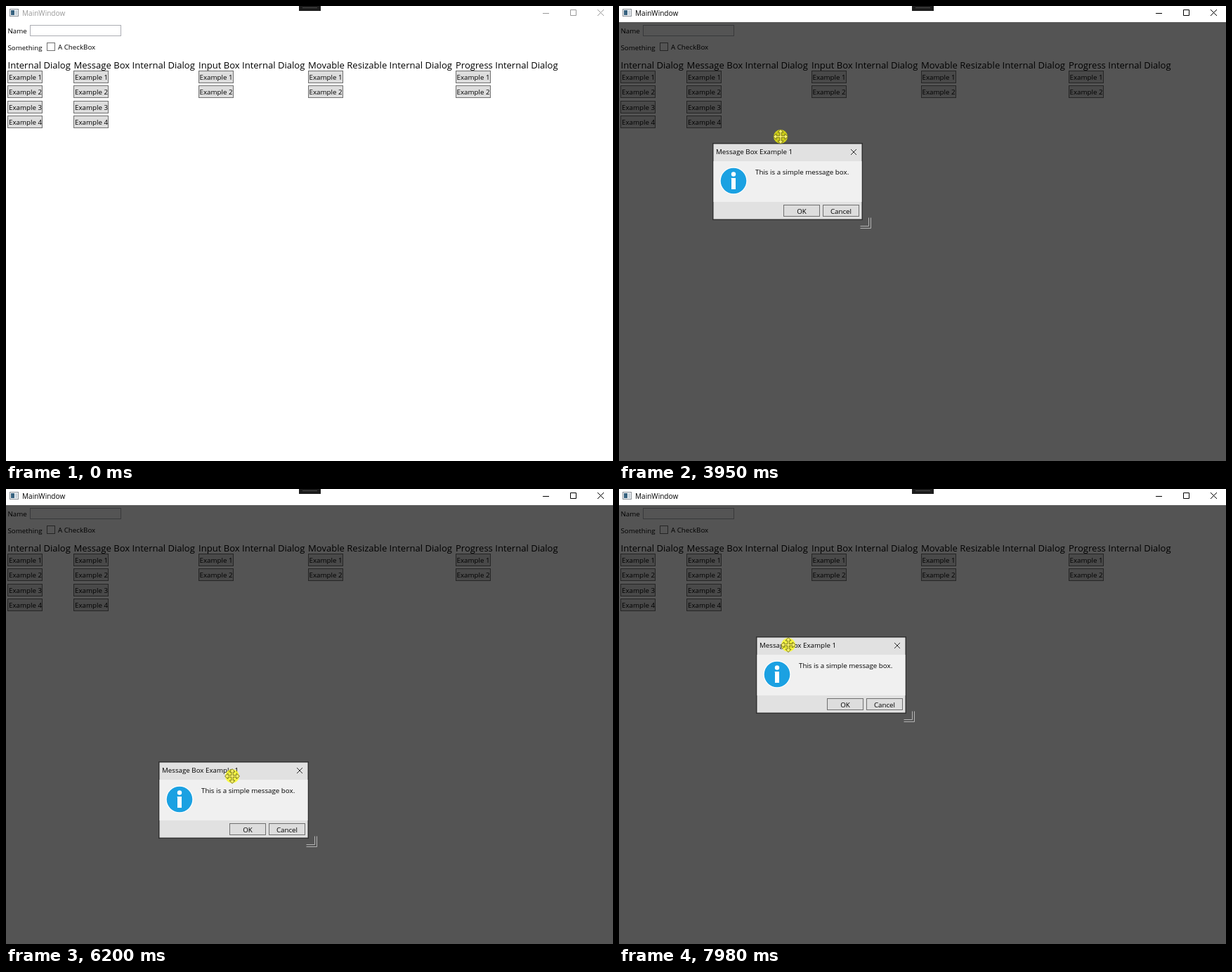
An HTML page for the animation above (8 s loop, 864 by 648 pixels).

```html
<!DOCTYPE html>
<html lang="en">
<head>
<meta charset="utf-8">
<title>Internal dialogs</title>
<style>
  html, body { margin: 0; width: 100%; height: 100%; overflow: hidden; background: #fff; }
  svg { display: block; width: 100%; height: 100%; }
  text { font: 9.75px "Open Sans", "Noto Sans", sans-serif; fill: #000; }
  .heading { font-size: 13.07px; }
  .title { font-size: 10.05px; }
  .line { fill: none; stroke: #000; }
  .field { fill: #fff; stroke: #abadb3; }
  .check { fill: #fff; stroke: #707070; }
  .button { fill: #ddd; stroke: #707070; }
  .hover { fill: #bee6fd; stroke: #3c7fb1; }
  .inactive text { fill: #999; }
  .inactive .line { stroke: #999; }
</style>
</head>
<body>
<svg viewBox="0 0 864 648">
  <g id="page"></g>
  <rect id="shade" y="23" width="864" height="625" fill="#000" fill-opacity=".672"/>
  <g id="titleBar">
    <rect x="5.5" y="4.5" width="12" height="10" fill="#f4f6f8" stroke="#8a9097"/>
    <rect x="7" y="6" width="5" height="7" fill="#37627f"/>
    <rect x="13" y="6" width="3" height="7" fill="#c9d4dc"/>
    <text class="title" x="23" y="14">MainWindow</text>
    <path class="line" d="M764 10.5h9M803.5 5.5h8v8h-8zM842 5l9 9M851 5l-9 9"/>
  </g>
  <rect x="417" width="31" height="7" fill="#1c1c1c"/>
  <path d="M422 2.5h21" stroke="#4a4a4a"/>

  <g id="dialog">
    <path d="M225.5 106.5v15h-15M222.5 106.5v12h-12" fill="none" stroke="#b4b4b4"/>
    <rect width="214" height="110" fill="#303030"/>
    <rect x="1.5" y="1.5" width="211" height="107" fill="#e1e1e1"/>
    <rect x="1.5" y="26" width="211" height="58" fill="#f0f0f0"/>
    <text x="5" y="16">Message Box Example 1</text>
    <path class="line" d="M197 9l8 8M205 9l-8 8" stroke-width=".8"/>
    <circle cx="30" cy="54" r="19.5" fill="#fff"/>
    <circle cx="30" cy="54" r="18.3" fill="#1ba1e2"/>
    <circle cx="30" cy="44.5" r="3.2" fill="#fff"/>
    <path d="M26.500 50h6.500v16h-6v-14.500z" fill="#fff"/>
    <text x="61" y="44.5">This is a simple message box.</text>
    <rect class="button" x="101.5" y="88.5" width="51" height="16"/>
    <rect class="button" x="157.5" y="88.5" width="51" height="16"/>
    <text x="127" y="100.5" text-anchor="middle">OK</text>
    <text x="183" y="100.5" text-anchor="middle">Cancel</text>
  </g>

  <g id="cursor">
    <circle id="press" r="10" fill="#ff0" fill-opacity=".7"/>
    <path id="arrow" d="M.5.5v14l3.2-3 2.3 5 2.300-1-2.200-4.800h4.400z" fill="#fff" stroke="#000" stroke-width=".9"/>
    <path id="move" fill="#fbf36a" stroke="#5c5c10" stroke-width=".8"/>
  </g>
</svg>
<script>
const $ = id => document.getElementById(id);
const STEP = 77.45, LOOP = 8000;
const ENTER = 5, HOVER = 16, ACTIVATE = 22, RELEASE = 24, OPEN = 25, ON_TITLE = 38, DRAG = 41;
const GRAB = [95, 13], LEAD = 0.7;

// Turning points and rests as [step, x, y]; along() sweeps smoothly between them.
const approach = [
  [ENTER, 811, 628], [15, 142, 110], [18, 130, 100], [27, 130, 100],
  [30, 302, 248], [32, 302, 248], [39, 420, 296]
];
const swing = [
  [DRAG, 325, 281], [43, 353, 305], [47, 335, 372], [51, 133, 195], [53, 150, 150],
  [60, 501, 312], [64, 470, 381], [68, 217, 316], [72, 165, 338], [73, 165, 338],
  [83, 263, 421], [85, 385, 449], [86, 477, 433], [92, 592, 189], [96, 592, 189],
  [103, 195, 210], [105, 80, 206]
];

// Monotone cubic: no overshoot at turning points, no drift during rests.
function along(path, step) {
  const last = path.length - 1;
  const t = Math.min(Math.max(step, path[0][0]), path[last][0]);
  const i = Math.min(path.findLastIndex(p => p[0] <= t), last - 1);
  const span = path[i + 1][0] - path[i][0], k = (t - path[i][0]) / span;
  return [1, 2].map(axis => {
    const slope = j => j < 0 || j >= last ? 0
      : (path[j + 1][axis] - path[j][axis]) / (path[j + 1][0] - path[j][0]);
    const speed = j => {
      const a = slope(j - 1), b = slope(j);
      return a * b > 0 ? 2 * a * b / (a + b) : 0;
    };
    const from = path[i][axis], to = path[i + 1][axis];
    return Math.round(from + (to - from) * k * k * (3 - 2 * k)
      + span * k * (1 - k) * (speed(i) * (1 - k) - speed(i + 1) * k));
  });
}

const label = (x, y, text, cls = "") => `<text class="${cls}" x="${x}" y="${y}">${text}</text>`;
const box = (x, y, w, h, cls) =>
  `<rect class="${cls}" x="${x + .5}" y="${y + .5}" width="${w}" height="${h}"/>`;

const columns = [
  [2, "Internal", 4], [96, "Message Box Internal", 4], [273.5, "Input Box Internal", 2],
  [429.5, "Movable Resizable Internal", 2], [639.5, "Progress Internal", 2]
];
let page = label(2.5, 39, "Name") + box(34, 27, 129, 15, "field") +
  label(2.5, 63, "Something") + box(58, 52, 11, 11, "check") + label(74, 62, "A CheckBox");
for (const [x, kind, count] of columns) {
  page += label(x + .5, 89, `${kind} Dialog`, "heading");
  for (let i = 0; i < count; i++) {
    const y = Math.floor(92 + 21.6 * i);
    page += box(Math.round(x), y, 49, 17, "button") + label(x + 2, y + 13, `Example ${i + 1}`);
  }
}
$("page").innerHTML = page;
const hoverButton = document.querySelectorAll("#page .button")[columns[0][2]];

// Four-way arrow: one arm, turned four times.
const arm = [[-1.2, -1.2], [-1.2, -6], [-4, -6], [0, -10.5], [4, -6], [1.2, -6]];
const turn = ([x, y], n) => n ? turn([-y, x], n - 1) : [x, y];
$("move").setAttribute("d", "M" + [0, 1, 2, 3].flatMap(n => arm.map(p => turn(p, n))).join("L") + "z");

const show = (id, on) => { $(id).style.display = on ? "" : "none"; };
const place = (id, [x, y]) => $(id).setAttribute("transform", `translate(${x} ${y})`);

function draw(time) {
  const step = Math.floor((time % LOOP + 25) / STEP);
  const dragging = step >= DRAG;
  // The dialog trails the pointer while it is dragged.
  const pointer = dragging
    ? along(swing, step + LEAD).map((v, i) => v + GRAB[i])
    : along(approach, step);

  $("titleBar").setAttribute("class", step < ACTIVATE ? "inactive" : "");
  hoverButton.classList.toggle("hover", step >= HOVER && step < OPEN);
  show("shade", step >= OPEN);
  show("dialog", step >= OPEN);
  place("dialog", along(swing, step));
  show("cursor", step >= ENTER);
  place("cursor", pointer);
  show("press", dragging || (step >= ACTIVATE && step < RELEASE));
  show("arrow", step < ON_TITLE);
  show("move", step >= ON_TITLE);
}

const start = performance.now();
function tick() {
  draw(performance.now() - start);
  requestAnimationFrame(tick);
}
tick();
</script>
</body>
</html>
```
